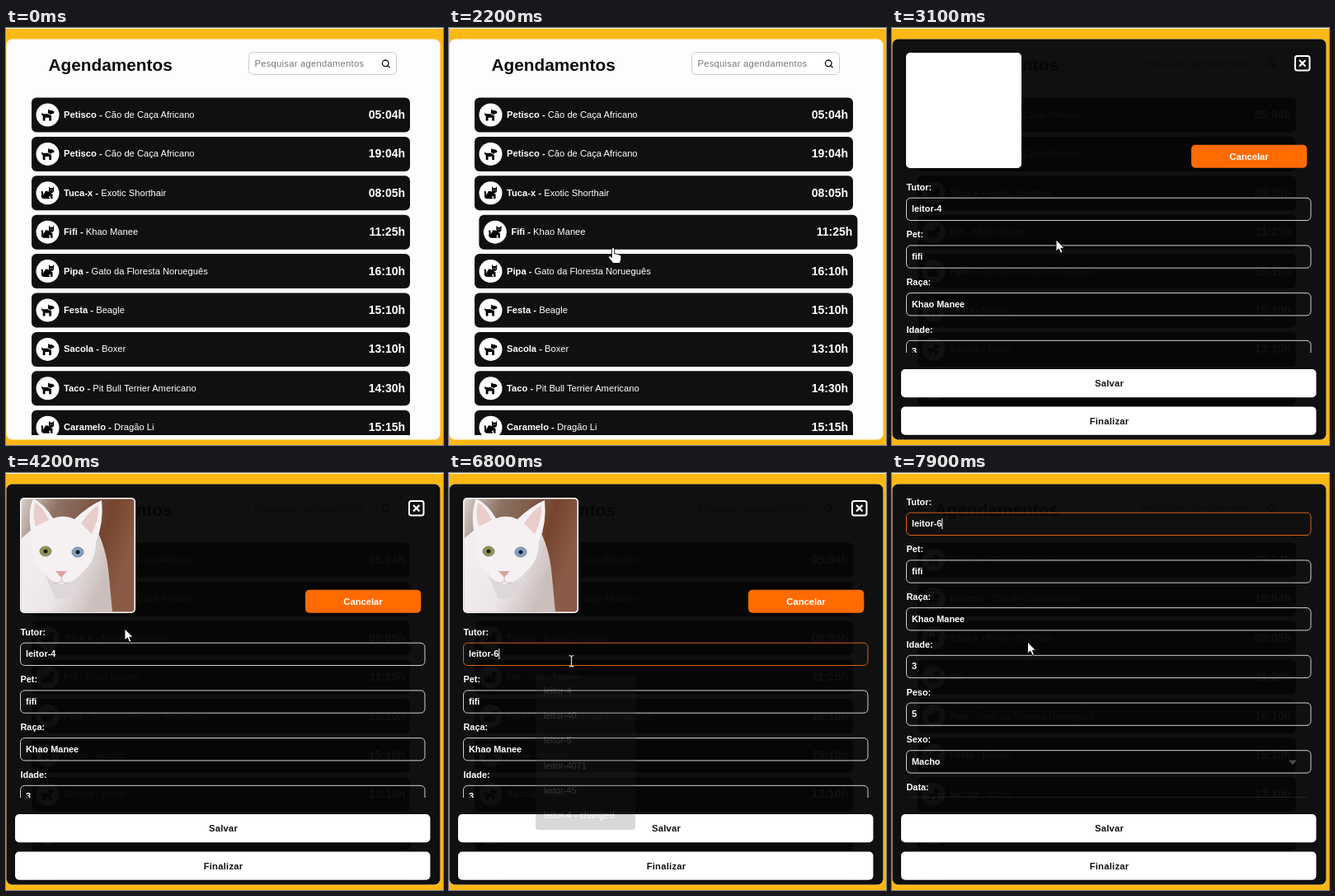
Animation, 530 px wide and 506 px high, one loop 8000 ms. Source, as an HTML page:

```html
<!DOCTYPE html>
<html lang="pt">
<head>
<meta charset="utf-8">
<style>
html, body { margin: 0; width: 100%; height: 100%; overflow: hidden; }
svg { display: block; width: 530px; height: 506px; background: #fdb815; }
text { font: 11.2px Arial, "Liberation Sans", sans-serif; fill: #fff; white-space: pre; }
.b { font-weight: bold; }
.f { font-weight: bold; font-size: 10.9px; }
.time { font-weight: bold; font-size: 14px; text-anchor: end; }
.mid { text-anchor: middle; }
.box { fill: none; stroke: #d0d0d0; }
</style>
</head>
<body>
<svg viewBox="0 0 530 506">
  <defs>
    <clipPath id="listClip"><rect y="60" width="530" height="434"/></clipPath>
    <clipPath id="formClip"><rect x="1" y="14" width="525" height="380"/></clipPath>
    <clipPath id="photoClip"><rect x="18.500" y="31.500" width="137" height="137" rx="4"/></clipPath>
    <linearGradient id="wall" x2="1" y2=".35">
      <stop stop-color="#d9d0cc"/><stop offset=".3" stop-color="#8d7365"/>
      <stop offset=".75" stop-color="#75452f"/><stop offset="1" stop-color="#8a5c47"/>
    </linearGradient>
    <linearGradient id="fur" x2="1" y2=".4">
      <stop stop-color="#f4f0f1"/><stop offset=".6" stop-color="#ece6e8"/><stop offset="1" stop-color="#cbbfbd"/>
    </linearGradient>
    <g id="dog">
      <path d="M-7.500-3.500q.2 2.300 2.500 2.300H0L4.500 1V7H1.700V3.200H-3V7H-5.800V1.500Q-8 0-7.500-3.500z"/>
      <path d="M.8-7 3-5.600H5.200L8-4Q8-1.300 5-1.300H4.500V0L.3-2z"/>
    </g>
    <g id="cat">
      <path d="M-2.500-2.500Q1-2.700 2.500-1L6 1.500V7H3.800L3 3 1 5.500H2.500V7H-4.500Q-8.500 6.500-7.500 2-7-.5-8-1.500L-6.600-2.800Q-4.700-1-5.500 3z"/>
      <path d="M1.500-8 3.300-6H5.800L7.600-8V-2.500Q7 0 4.500 0T1.500-2.500z"/>
      <path d="M3-3.600h1M5.200-3.600h1" stroke="#fff" stroke-width=".9"/>
    </g>
  </defs>
  <rect width="530" height="1" fill="#fff3d3"/>
  <rect x=".5" y="13.500" width="526" height="486" rx="7" fill="#fdfdfd"/>
  <text x="51.500" y="52" class="b" style="font-size:20.8px;fill:#0b0b0b">Agendamentos</text>
  <rect x="294.500" y="29.500" width="179" height="27" rx="5" fill="#fff" stroke="#ccc"/>
  <text x="301.500" y="47" style="letter-spacing:.27px;fill:#777">Pesquisar agendamentos</text>
  <path d="M463 45.500l2.600 2.600M464 42.800a3.800 3.800 0 1 1-7.600 0a3.800 3.800 0 1 1 7.600 0" fill="none" stroke="#111" stroke-width="1.300"/>
  <g id="list" clip-path="url(#listClip)"></g>

  <g id="modal">
    <rect x=".5" y="13.500" width="526" height="486" rx="7" fill="#060606" fill-opacity=".957"/>
    <g clip-path="url(#formClip)"><g id="form">
      <rect x="17" y="30" width="140" height="140" rx="5" fill="#fff"/>
      <g id="photo" clip-path="url(#photoClip)">
        <rect x="18" y="31" width="138" height="138" fill="url(#wall)"/>
        <path d="M18 80 34 66 106 62Q122 88 125 126L129 169H18z" fill="url(#fur)"/>
        <path d="M32 82Q25 48 33 31 47 38 57 55 71 50 83 56 100 40 116 33 119 60 109 84 109 107 92 121 79 137 66 136 53 135 44 120 29 105 32 82z" fill="#f5f1f3"/>
        <path d="M36 65Q31 44 36 36 45 42 52 57zM91 61Q102 45 112 39 113 56 104 74z" fill="#e9cdca"/>
        <path d="M46 121Q65 148 94 121 85 155 60 153z" fill="#ded7da"/>
        <ellipse cx="48" cy="95" rx="7" ry="6" fill="#8c9a45" stroke="#8a7a7c"/>
        <ellipse cx="87" cy="96" rx="7" ry="6" fill="#7fa3d0" stroke="#8a7a7c"/>
        <circle cx="48" cy="95" r="2.500" fill="#1b1b1b"/><circle cx="87" cy="96" r="2.500" fill="#1b1b1b"/>
        <path d="M60 119H74L67 127z" fill="#dba3a0"/>
        <path d="M67 127v4q-4 4-9 2M67 131q4 4 9 2" fill="none" stroke="#d3b5b5"/>
      </g>
      <rect x="489" y="34" width="17.500" height="17.500" rx="2.500" fill="none" stroke="#fff" stroke-width="2"/>
      <path d="M494 39l7.500 7.500M501.500 39l-7.500 7.500" stroke="#fff" stroke-width="2.200"/>
      <rect x="363" y="141.700" width="140.300" height="28" rx="5" fill="#ff6b00"/>
      <text x="433" y="160" class="b mid">Cancelar</text>
      <path d="M481 506.500h10l-5 5.500z" fill="#4b4b4b"/>
    </g></g>
    <rect x="11" y="414" width="503.500" height="34.300" rx="5" fill="#fff"/>
    <rect x="11" y="459.500" width="503.500" height="34.300" rx="5" fill="#fff"/>
    <g class="mid" style="letter-spacing:.25px">
      <text x="263.500" y="435" class="b" style="fill:#111">Salvar</text>
      <text x="263.500" y="480.500" class="b" style="fill:#111">Finalizar</text>
    </g>
    <g id="popup">
      <path d="M105 250q0-4 4-4h13l6-5 6 5h88q4 0 4 4v179q0 4-4 4h-113q-4 0-4-4z" fill="#2b2b2b"/>
    </g>
  </g>

  <g id="cursor" fill="#fff" stroke="#000" stroke-width=".9" stroke-linejoin="round">
    <path id="hand" d="M-1.700 1.500Q-1.700-.4 0-.4T1.700 1.500V7Q3.500 6 4.800 7.600 6.500 6.700 7.500 8.300 9.800 7.700 9.800 10.500V14L8 18.500H0L-5.500 11.500Q-5.800 9-3.500 9.800L-1.700 11.500z"/>
    <path id="arrow" d="M0 0V14L3.300 11 5.600 16.300 8 15.200 5.700 10.200H10z"/>
    <path id="beam" d="M-3-6.500q3 0 3 2 0-2 3-2M0-4.500V5M-3 7q3 0 3-2 0 2 3 2" fill="none" stroke="#ddd" stroke-width="1.200"/>
  </g>
</svg>
<script>
const $ = id => document.getElementById(id);
const LOOP = 8000, TOP = 84.5, PITCH = 47.4, ROW_H = 42;

const pets = [
  ['dog', 'Petisco', 'Cão de Caça Africano', '05:04h'],
  ['dog', 'Petisco', 'Cão de Caça Africano', '19:04h'],
  ['cat', 'Tuca-x', 'Exotic Shorthair', '08:05h'],
  ['cat', 'Fifi', 'Khao Manee', '11:25h'],
  ['cat', 'Pipa', 'Gato da Floresta Norueguês', '16:10h'],
  ['dog', 'Festa', 'Beagle', '15:10h'],
  ['dog', 'Sacola', 'Boxer', '13:10h'],
  ['dog', 'Taco', 'Pit Bull Terrier Americano', '14:30h'],
  ['cat', 'Caramelo', 'Dragão Li', '15:15h']
];
$('list').innerHTML = pets.map(([icon, name, breed, time], i) => {
  const y = TOP + i * PITCH;
  return `<g><rect x="31" y="${y}" width="459" height="${ROW_H}" rx="6" fill="#101010"/>
    <circle cx="50.5" cy="${y + 21}" r="14" fill="#fff"/>
    <use href="#${icon}" x="50.5" y="${y + 21}"/>
    <text x="70" y="${y + 24.5}"><tspan class="b">${name} - </tspan>${breed}</text>
    <text x="484" y="${y + 25.5}" class="time">${time}</text></g>`;
}).join('');

const fields = [['Tutor', ''], ['Pet', 'fifi'], ['Raça', 'Khao Manee'], ['Idade', '3'], ['Peso', '5'], ['Sexo', 'Macho'], ['Data', '']];
$('form').insertAdjacentHTML('beforeend', fields.map(([label, value], i) => {
  const y = 206.2 + i * 57.7;
  return `<text x="17.500" y="${y - 9.5}" class="f">${label}:</text>
    <rect x="17.500" y="${y}" width="490.500" height="27.300" rx="5" class="box"/>
    <text x="24" y="${y + 17}" class="f">${value}</text>`;
}).join('') + '<rect id="caret" y="213" width="1" height="13" fill="#fff"/>');
const tutorBox = $('form').querySelector('.box'), tutor = tutorBox.nextElementSibling;

const options = ['4', '40', '5', '4071', '45', '4 - changed'];
$('popup').insertAdjacentHTML('beforeend', options.map((n, i) =>
  `<text x="115" y="${268 + i * 30.2}" style="font-size:11px">leitor-${n}</text>`).join(''));

// pointer tip: time, x, y
const path = [
  [700, 212, 212], [1200, 205, 101], [1500, 204, 100], [2000, 200, 235], [2150, 199, 267],
  [2250, 199, 267], [2500, 199, 257], [3150, 199, 257], [3600, 144, 189], [4550, 144, 189],
  [5350, 148.5, 228], [7100, 148.5, 228], [7300, 164.5, 205], [LOOP, 164.5, 205]
];
const clamp = v => Math.min(1, Math.max(0, v));
const ramp = (t, a, b) => clamp((t - a) / (b - a));
const smooth = k => k * k * (3 - 2 * k);

function pointer(t) {
  const i = Math.max(1, path.findIndex(p => p[0] >= t));
  const [t0, x0, y0] = path[i - 1], [t1, x1, y1] = path[i];
  const k = smooth(ramp(t, t0, t1));
  return [x0 + (x1 - x0) * k, y0 + (y1 - y0) * k];
}

function hovered(t) {
  if (t < 700 || t > 2750) return -1;
  const d = pointer(t)[1] - TOP, i = Math.floor(d / PITCH);
  return d - i * PITCH <= ROW_H ? i : -1;
}

const show = (id, on) => $(id).style.display = on ? '' : 'none';

function draw(t) {
  // each row slides by the share of the last 180 ms it was hovered
  const shift = pets.map(() => 0);
  for (let k = 0; k < 18; k++) {
    const i = hovered(t - k * 10);
    if (i >= 0) shift[i] += 5.4 / 18;
  }
  [...$('list').children].forEach((row, i) => row.setAttribute('transform', `translate(${shift[i]})`));

  $('modal').style.opacity = ramp(t, 2750, 3000);
  $('photo').style.opacity = ramp(t, 3650, 3750);
  $('form').setAttribute('transform', `translate(0 ${-158 * smooth(ramp(t, 7420, 7880))})`);

  tutor.textContent = 'leitor-' + (t < 5900 ? '4' : t < 6500 ? '' : '6');
  const f = ramp(t, 5620, 5800);
  tutorBox.style.stroke = `rgb(${208 + 8 * f},${208 - 112 * f},${208 - 182 * f})`;
  $('caret').setAttribute('x', 24 + tutor.getComputedTextLength());
  show('caret', t >= 5400 && !(t >= 7000 && t < 7300));
  $('popup').style.opacity = t < 5900 ? 0 : t < 6700 ? 1 : .18 * (1 - ramp(t, 6800, 7000));

  const [x, y] = pointer(t);
  const beam = t > 5250 && t < 7150, hand = hovered(t) >= 0;
  $('cursor').setAttribute('transform', `translate(${x} ${y})`);
  show('cursor', t >= 700);
  show('hand', hand);
  show('beam', beam);
  show('arrow', !hand && !beam);
}

const start = performance.now();
function tick(now) {
  draw(Math.max(0, now - start) % LOOP);
  requestAnimationFrame(tick);
}
draw(0);
requestAnimationFrame(tick);
</script>
</body>
</html>
```
